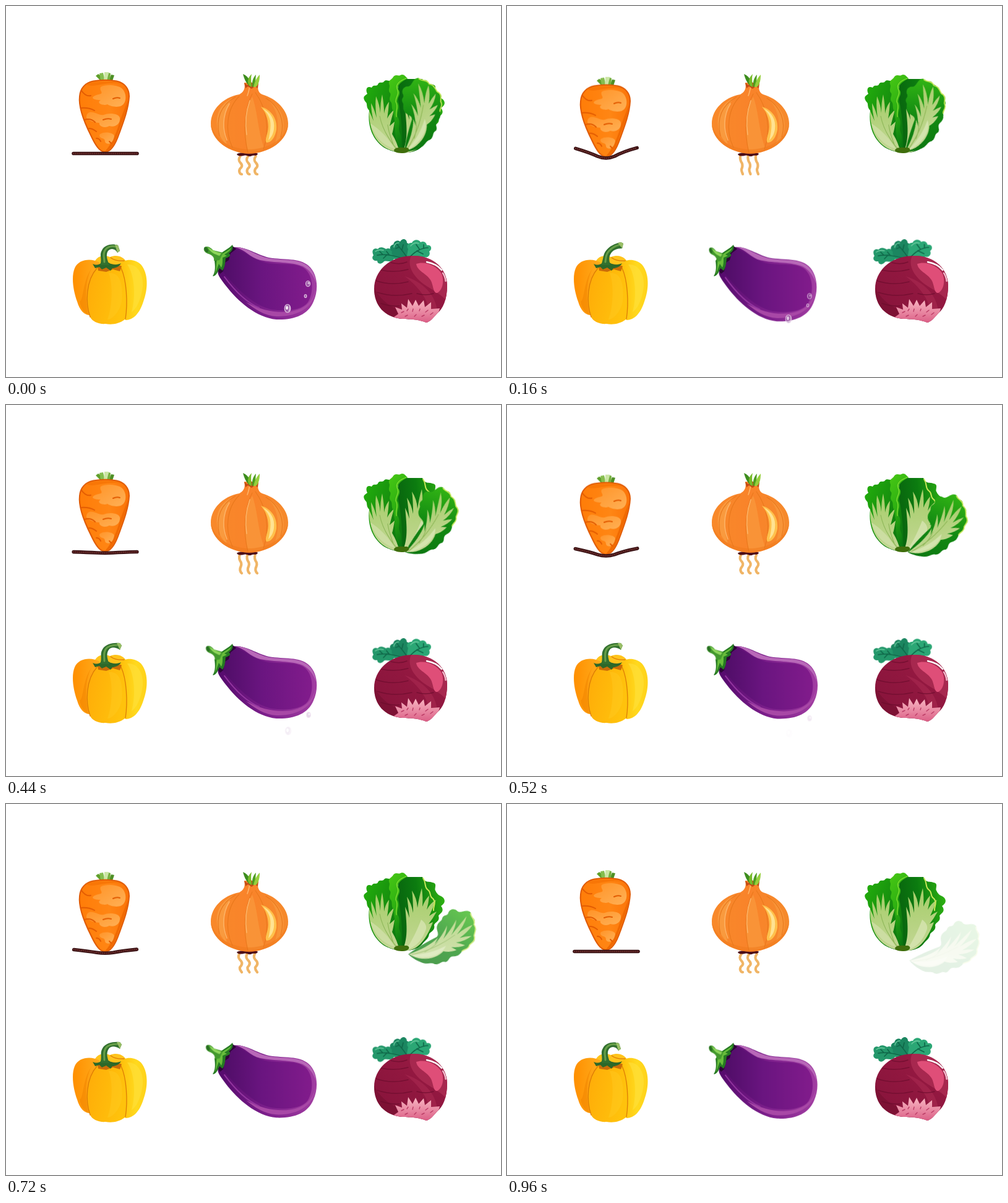
An HTML page for the animation above (1000 ms loop, 800 by 600 pixels).

```html
<!DOCTYPE html>
<html lang="en">
<head>
<meta charset="utf-8">
<title>Vegetables</title>
<style>
html, body { margin: 0; width: 100%; height: 100%; overflow: hidden; background: #fff; }
svg { display: block; width: 800px; height: 600px; }
.line { fill: none; stroke-linecap: round; stroke-linejoin: round; }
.anim { animation: 1s linear infinite; }

/* carrot on its rope: two bounces, then rest */
.carrot { animation-name: bounce; }
.rope { animation-name: rope; }
.carrot, .rope { animation-timing-function: cubic-bezier(.364, 0, .636, 1); }
@keyframes bounce {
  0%, 40%, 80%, 100% { transform: none; }
  20%, 60% { transform: translateY(8.5px); }
}
@keyframes rope {
  0%, 40%, 80%, 100% { d: path("M109 238.5Q132 238.5 147 238.5Q160 238.5 173 238.5Q188 238.5 212 238.5"); }
  20%, 60% { d: path("M111 229.5Q134 237 146 243.5Q160 250 174 243.5Q188 235 210 228.5"); }
}

/* onion roots */
.root { animation-name: wave; }
@keyframes wave {
  0%, 80%, 100% { d: path("M379 243C375 248 376 251 379 254C383 258 381 261 378 263C375 267 377 272 381 272"); }
  16% { d: path("M377 242C376 248 377 251 380 254C382 258 381 261 379 264C378 268 381 271 381 272"); }
  28% { d: path("M377 242C377 248 378 251 379 254C380 258 379 261 379 264C380 268 381 270 381 272"); }
  44% { d: path("M378 243C375 248 377 251 380 254C383 258 380 261 378 264C376 268 379 272 381 272"); }
  60%, 96% { d: path("M377 242C374 248 377 251 380 254C383 258 381 261 378 264C377 268 381 271 381 272"); }
}

/* lettuce leaf peels off, drops and fades */
.fall { transform-origin: 650px 240px; animation-name: fall; }
@keyframes fall {
  0% { transform: translate(-5px, -3px) rotate(-40deg); opacity: 1; }
  16% { transform: translate(-5px, -3px) rotate(-37deg); }
  28% { transform: translate(-5px, -2px) rotate(-28deg); }
  44% { transform: translate(-4px, 0) rotate(-21deg); }
  60% { transform: none; opacity: 1; }
  80% { transform: translateY(8px) rotate(9deg); opacity: .58; }
  96% { transform: translateY(15px) rotate(12deg); opacity: .12; }
  100% { transform: translateY(16px) rotate(12deg); opacity: 0; }
}

/* pepper stem uncurls */
.stem { animation-name: stem; }
.tip { animation-name: tip; }
.shine { animation-name: shine; }
@keyframes stem {
  0%, 96%, 100% { d: path("M152 419C156 409 150 403 155 395C160 385 173 384 181 387L184 396L180 399C177 392 169 391 165 396C161 402 163 409 167 419Z"); }
  16% { d: path("M152 419C156 409 155 403 159 397C165 388 175 384 184 382L188 384L186 392C177 392 171 395 168 400C164 406 165 411 167 419Z"); }
  28% { d: path("M152 419C157 409 158 404 163 398C169 388 178 380 188 376L193 378L192 386C181 388 174 393 170 400C167 406 166 411 167 419Z"); }
  44%, 80% { d: path("M152 419C156 409 151 403 156 395C161 386 174 384 184 385L187 389L184 396C177 391 169 391 166 396C162 402 163 409 167 419Z"); }
}
@keyframes tip {
  0%, 96%, 100% { d: path("M176 386L181 387L184 396L180 399Z"); }
  16% { d: path("M179 383L184 382L188 384L186 392Z"); }
  28% { d: path("M183 379L188 376L193 378L192 386Z"); }
  44%, 80% { d: path("M179 385L184 385L187 389L184 396Z"); }
}
@keyframes shine {
  0%, 96%, 100% { d: path("M159 414C159 406 156 402 160 395C164 389 171 388 177 389"); }
  16% { d: path("M159 414C160 406 160 402 164 397C169 391 175 388 182 386"); }
  28% { d: path("M159 414C161 406 163 402 167 397C172 390 180 384 187 381"); }
  44%, 80% { d: path("M159 414C159 406 157 402 161 395C165 389 173 388 181 388"); }
}

/* eggplant */
.squash { transform-origin: 350px 400px; animation-name: squash; }
.stub { transform-origin: 347px 404px; animation-name: stub; }
@keyframes squash {
  0%, 28%, 44%, 80%, 100% { transform: none; }
  16% { transform: scale(.988, 1.027); }
  60% { transform: scale(.997, 1.008); }
  96% { transform: scale(.996, 1.016); }
}
@keyframes stub {
  0%, 100% { transform: none; }
  16%, 96% { transform: translateY(1.5px) scaleX(.75); }
  28%, 44%, 60%, 80% { transform: translateY(.5px) scaleX(.88); }
}
.d1 { animation-name: drip1; }
.d2 { animation-name: drip2; }
.d3 { animation-name: drip3; }
@keyframes drip1 {
  0% { transform: none; opacity: 1; }
  16% { transform: translateY(17px); opacity: .8; }
  28% { transform: translateY(29px); opacity: .6; }
  44% { transform: translate(1px, 38px); opacity: .2; }
  54%, 100% { transform: translate(1px, 43px); opacity: 0; }
}
@keyframes drip2 {
  0% { transform: none; opacity: 1; }
  16% { transform: translate(1px, 20px); opacity: .7; }
  28% { transform: translate(1px, 39px); opacity: .6; }
  44% { transform: translate(1px, 52px); opacity: .45; }
  60% { transform: translate(1px, 63px); opacity: .1; }
  65%, 100% { transform: translate(1px, 65px); opacity: 0; }
}
@keyframes drip3 {
  0% { transform: none; opacity: 1; }
  16% { transform: translate(2px, 15px); opacity: .7; }
  28% { transform: translate(2px, 27px); opacity: .5; }
  44%, 100% { transform: translate(2px, 38px); opacity: 0; }
}

/* beet greens */
.greens { transform-origin: 650px 408px; animation-name: sway; }
@keyframes sway {
  0%, 80%, 100% { transform: none; }
  16%, 60% { transform: rotate(-1.2deg); }
  28%, 44% { transform: rotate(-.7deg); }
}
</style>
</head>
<body>
<svg viewBox="0 0 800 600">
<defs>
  <linearGradient id="gCarrot"><stop offset="0" stop-color="#ff7d08"/><stop offset=".6" stop-color="#ff8614"/><stop offset="1" stop-color="#fb7408"/></linearGradient>
  <linearGradient id="gGlow" x1="0" y1="0" x2="1" y2="1"><stop offset="0" stop-color="#ff9428"/><stop offset="1" stop-color="#ffb055"/></linearGradient>
  <linearGradient id="gOnion"><stop offset="0" stop-color="#f8892a"/><stop offset=".5" stop-color="#f9832a"/><stop offset="1" stop-color="#f58a2c"/></linearGradient>
  <linearGradient id="gLeaf" x1="0" y1=".4" x2="1" y2=".2"><stop offset="0" stop-color="#08640e"/><stop offset=".45" stop-color="#0c7c10"/><stop offset="1" stop-color="#2fb312"/></linearGradient>
  <linearGradient id="gFall" x1="0" y1="1" x2=".8" y2="0"><stop offset="0" stop-color="#0b7410"/><stop offset=".55" stop-color="#128a12"/><stop offset="1" stop-color="#30b214"/></linearGradient>
  <linearGradient id="gLeft" x1="0" y1="0" x2="1" y2=".8"><stop offset="0" stop-color="#24b00c"/><stop offset="1" stop-color="#0b7410"/></linearGradient>
  <linearGradient id="gMid" x1="0" y1="0" x2=".3" y2="1"><stop offset="0" stop-color="#48c814"/><stop offset=".5" stop-color="#2eb012"/><stop offset="1" stop-color="#0b7a10"/></linearGradient>
  <linearGradient id="gRib" x1="0" y1="0" x2="0" y2="1"><stop offset="0" stop-color="#a5cd68"/><stop offset="1" stop-color="#c3d795"/></linearGradient>
  <linearGradient id="gPepL"><stop offset="0" stop-color="#ff8f00"/><stop offset="1" stop-color="#ffac1c"/></linearGradient>
  <linearGradient id="gPepC" x1="0" y1="0" x2="1" y2=".3"><stop offset="0" stop-color="#ffab08"/><stop offset="1" stop-color="#ffc20c"/></linearGradient>
  <linearGradient id="gPepR"><stop offset="0" stop-color="#ffbe0a"/><stop offset=".6" stop-color="#ffd91e"/><stop offset="1" stop-color="#ffd21a"/></linearGradient>
  <linearGradient id="gEgg"><stop offset="0" stop-color="#4e0d66"/><stop offset=".45" stop-color="#6a1580"/><stop offset="1" stop-color="#821c8c"/></linearGradient>
  <linearGradient id="gEdge"><stop offset="0" stop-color="#540a6c"/><stop offset=".5" stop-color="#7d1f8c"/><stop offset="1" stop-color="#a23ea2"/></linearGradient>
  <linearGradient id="gBeet" x1="0" y1="1" x2="1" y2="0"><stop offset="0" stop-color="#841239"/><stop offset="1" stop-color="#9c1c45"/></linearGradient>
  <linearGradient id="gTail" x1="0" y1="0" x2="0" y2="1"><stop offset="0" stop-color="#f9b9c4"/><stop offset="1" stop-color="#da5c84"/></linearGradient>
  <clipPath id="cBeet"><path d="M655 404C690 402 713 425 713 452C713 475 706 490 697 497C690 505 685 511 679 512C670 508 655 506 640 506C612 503 595 485 595 457C595 430 618 405 655 404Z"/></clipPath>
  <path id="root" class="anim root"/>
</defs>

<!-- carrot -->
<g class="anim carrot">
  <path fill="#5f9f2a" d="M153 121L145 113L149 110L157 115L160 121Z"/>
  <path fill="#4d8f25" d="M166 121L170 111L175 112L172 121Z"/>
  <path fill="#85bd4e" d="M153 121L151 109L157 108L160 121Z"/>
  <path fill="#cbe6a4" d="M158 121L159 107L166 107L164 121Z"/>
  <path fill="#76b040" d="M163 121L166 108L169 109L168 121Z"/>
  <path fill="url(#gCarrot)" stroke="#df5a04" stroke-width="2" d="M160 236C151 236 144 224 137 209C126 187 117 163 119 146C120 133 128 124 141 121.500C153 119.500 168 119.500 179 121.500C191 124 199 133 199 146C198 166 190 187 183 206C177 224 169 236 160 236Z"/>
  <path fill="#f87606" d="M129 127C138 121 180 120 186 126C176 124 166 125 153 127C143 129 136 130 129 127Z"/>
  <path fill="#f06a02" d="M198 150C197 166 188 187 182 203C177 221 170 234 160 235C172 222 180 201 184 186C190 170 194 160 198 150Z"/>
  <g fill="url(#gGlow)">
    <path d="M153 131C161 126 180 128 187 133C196 141 195 157 187 161C180 165 168 162 164 159C157 162 145 157 153 152C137 152 136 146 150 143C160 141 150 137 153 131Z"/>
    <path d="M133 173C140 168 150 178 158 176C167 172 183 174 184 181C185 191 176 197 167 194C158 199 149 193 151 189C143 189 133 185 130 181C130 178 130 175 133 173Z"/>
    <path d="M152 207C160 202 174 205 175 210C174 219 168 225 162 222C158 219 162 216 156 214C151 213 150 209 152 207Z"/>
  </g>
  <path class="line" stroke="#e35c02" stroke-width="2" d="M173 150Q179 147 184 149M157 184Q164 181 170 183M167 219L170 222M122 137Q129 147 137 145M121 165Q134 164 143 169M127 184Q137 181 144 188M134 198Q140 198 146 203M146 214Q151 214 153 219"/>
</g>
<path class="line anim rope" stroke="#3c1416" stroke-width="5.6"/>
<path class="line anim rope" stroke="#74322f" stroke-width="2.2" stroke-dasharray=".1 3"/>

<!-- onion -->
<g class="line" stroke="#f0b566" stroke-width="4.2">
  <use href="#root"/><use href="#root" x="12.5"/><use href="#root" x="25"/>
</g>
<path fill="#4c0c17" d="M373 240C374 236 405 236 407 239C405 244 400 240 396 243C391 244 388 240 384 242C380 243 375 243 373 240Z"/>
<path fill="url(#gOnion)" d="M385 124C387 132 385 139 377 143C350 148 331 168 331 190C331 218 362 238 393 239C425 238 456 218 456 190C456 169 438 150 414 143C407 140 406 132 408 124Z"/>
<g fill="#f99a3e">
  <path d="M366 149C348 157 339 174 341 192C342 205 348 217 357 224C349 199 350 170 366 149Z"/>
  <path d="M398 147C386 165 383 205 391 236C403 237 413 234 418 231C407 205 407 170 398 147Z" opacity=".7"/>
  <path d="M424 152C442 162 452 180 448 202C446 212 440 220 434 224C443 199 442 171 424 152Z" opacity=".7"/>
</g>
<path fill="#f17a1c" d="M331 190C331 218 362 238 393 239C425 238 456 218 456 190C452 213 428 230 396 232C362 232 337 216 331 190Z" opacity=".55"/>
<path class="line" stroke="#e9781c" stroke-width="1.1" d="M377 146C358 164 352 200 366 229M398 142C385 165 383 205 391 237M403 140C421 165 427 200 416 232M371 147C348 160 338 180 345 210M420 149C441 162 452 185 444 212"/>
<path class="line" stroke="#fdb366" stroke-width="1.6" d="M361 158C349 178 350 200 357 217M394 153C388 170 386 190 389 208M394 129C393 135 392 140 390 145"/>
<path fill="#ffc14c" d="M412 163C428 167 439 182 437 200C435 212 429 221 421 221C417 216 424 206 424 195C424 182 419 171 412 163Z"/>
<path fill="#ffe392" d="M415 166C428 172 435 184 433 199C432 207 428 214 424 217C427 205 429 190 426 182C423 174 419 170 415 166Z"/>
<path fill="#c44a14" d="M385 124L390 128L396 123L402 128L408 124L407 133L402 130L397 134L391 130L387 133Z"/>
<path fill="#3d8d1e" d="M394 130C388 125 385 118 383 110C390 113 395 119 397 130Z"/>
<path fill="#77bb2a" d="M393 129C389 122 391 116 397 110C395 118 397 124 397 131Z"/>
<path fill="#4e9d22" d="M398 131C397 121 400 115 404 111C403 118 404 122 402 130Z"/>
<path fill="#96cf3c" d="M400 131C402 122 405 116 410 111C410 119 409 126 404 131Z"/>

<!-- lettuce: back leaf, falling leaf, then the front ones -->
<path fill="url(#gLeaf)" d="M640 237C632 205 629 160 634 128C637 120 642 117 650 118L673 118C678 129 683 124 689 127C698 128 692 136 694 140C698 149 703 148 706 151C711 156 709 161 703 165C710 174 701 177 699 181C702 190 693 191 692 196C694 204 687 206 684 210C683 218 677 221 674 225C668 234 655 238 640 237Z"/>
<path fill="url(#gRib)" d="M641 236C651 215 647 190 645 166Q649 174 652 184Q650 164 648 150Q655 160 658 176Q658 154 656 140Q664 152 665 168Q668 148 672 136Q674 150 673 166Q677 155 684 148Q683 160 680 171Q686 160 695 155Q690 168 684 181Q689 177 696 174Q690 185 683 194L690 191C682 212 670 234 650 237Z"/>
<path fill="#d8e6b5" opacity=".75" d="M646 236C656 222 664 205 671 187C677 192 680 196 679 202C674 217 664 232 646 236Z"/>
<path class="line" stroke="#c9e85a" stroke-width="2" d="M674 120C680 128 675 134 682 139C688 143 683 149 690 153C696 160 690 166 691 172"/>
<g class="anim fall">
  <path fill="url(#gFall)" d="M650 238C663 226 680 214 693 206C698 200 690 195 692 188C693 181 699 180 699 175C701 168 708 171 708 165C711 157 719 158 722 161C728 165 734 157 742 160C748 163 743 168 749 170C755 174 749 180 753 184C759 189 751 194 753 199C758 208 750 210 747 214C747 222 739 221 736 225C732 233 728 234 721 235C716 236 716 244 711 245C704 243 702 251 694 250C688 247 682 252 675 250C668 248 658 245 650 238Z"/>
  <path fill="url(#gRib)" d="M651 238C670 229 685 219 695 207Q693 213 691 218Q702 203 708 186Q708 198 704 208Q715 192 722 175Q722 188 716 201Q728 183 738 168Q736 183 725 199Q738 186 749 181Q742 194 730 204Q740 200 749 199Q740 208 725 212Q734 213 740 215Q731 220 718 220L727 224Q718 229 706 228C698 239 675 250 651 238Z"/>
  <path fill="#dbe8b8" opacity=".75" d="M654 239C676 236 694 229 709 219C706 232 684 246 654 239Z"/>
  <path class="line" stroke="#91b95a" stroke-width="1.1" d="M656 238C682 230 705 215 722 200M676 232C685 226 692 220 696 213"/>
  <path class="line" stroke="#c9e85a" stroke-width="1.8" d="M744 163C744 168 754 173 751 180C756 186 754 190 753 198C757 206 750 210 747 214C746 222 739 221 736 225"/>
</g>
<path fill="url(#gLeft)" d="M640 237C606 237 582 208 587 169C581 163 585 158 581 155C575 147 580 145 584 142C580 134 584 129 591 132C594 126 598 131 601 127C603 121 608 126 611 122C615 118 619 123 623 120C634 130 643 200 640 237Z"/>
<path fill="url(#gRib)" d="M636 236C605 234 586 208 587 170Q591 178 594 186Q590 170 590 157Q595 166 599 181Q596 162 598 146Q604 160 605 173Q605 155 608 143Q611 160 611 174Q613 162 619 155Q618 170 616 182Q620 174 627 168Q623 182 620 194L628 187Q626 200 624 207C630 217 634 227 636 236Z"/>
<path fill="#d3e2ad" opacity=".7" d="M628 231C608 225 594 209 589 190C602 198 619 214 628 231Z"/>
<path class="line" stroke="#8fb85a" stroke-width="1.2" d="M631 231C618 215 608 199 604 178M626 224C622 213 618 204 617 192"/>
<path fill="url(#gMid)" d="M621 141C616 136 622 131 619 126C618 120 623 119 625 116C629 109 634 114 637 112C643 109 645 114 649 117C641 122 631 127 634 135C640 142 632 148 632 155C638 163 631 171 633 179C639 188 633 196 636 204C641 214 637 225 638 235C630 226 629 207 628 192C629 182 625 178 627 171C621 165 626 158 621 154C618 149 623 145 621 141Z"/>
<path class="line" stroke="#83de34" stroke-width="1.3" d="M647 117C638 120 629 126 632 134C637 142 629 148 630 155C635 163 629 171 631 179"/>
<path fill="#3f6e0c" d="M627 233C630 227 640 229 648 229C654 231 652 237 642 238C634 238 627 237 627 233Z"/>

<!-- pepper -->
<path fill="#ffc41c" d="M144 412C150 402 162 403 168 406C180 401 190 406 194 413L188 432L148 430Z"/>
<path fill="url(#gPepL)" d="M151 415C140 408 118 408 111 424C105 438 109 462 115 478C119 492 126 500 136 500C150 490 152 430 151 415Z"/>
<path fill="#f08600" opacity=".55" d="M147 416C129 427 126 465 133 499C125 496 121 488 119 478C127 475 122 435 147 416Z"/>
<path fill="url(#gPepR)" d="M184 418C190 409 207 408 218 418C230 432 230 457 222 478C216 497 206 508 193 508C184 490 184 440 184 418Z"/>
<path fill="#ffe23c" opacity=".6" d="M196 418C213 417 222 434 221 452C219 472 212 489 203 495C210 470 208 435 196 418Z"/>
<path fill="url(#gPepC)" d="M147 423C156 428 179 428 186 423C195 440 197 480 192 507C183 514 171 516 161 514C150 515 139 510 136 503C127 480 130 443 147 423Z"/>
<path fill="#ffcb24" opacity=".4" d="M166 432C184 430 190 450 187 478C184 494 172 507 164 507C172 485 173 450 166 432Z"/>
<path class="line" stroke="#dd7b05" stroke-width="1.3" d="M147 424C129 444 128 480 136 503M186 424C195 443 197 480 193 506M169 407Q177 413 191 412"/>
<path fill="#cb6d08" d="M148 421C158 417 178 416 187 421L184 429L173 426L162 430L149 428Z"/>
<path fill="#2c6829" d="M140 417C147 420 151 418 155 415L166 415C171 419 180 419 186 416C183 422 176 424 172 424L169 428L162 423L155 426L151 422L144 424Z"/>
<path class="anim stem" fill="#32702f"/>
<path class="line anim shine" stroke="#679f48" stroke-width="3"/>
<path class="anim tip" fill="#9abf67"/>

<!-- eggplant -->
<g class="anim squash">
  <path fill="url(#gEdge)" d="M364 391C384 386 401 401 425 407C450 411 474 407 489 420C505 434 505 461 497 478C488 500 465 508 437 507C405 504 375 478 355 452C346 440 339 432 344 426Z"/>
  <path fill="#b868b8" d="M370 390C388 389 402 403 425 408C450 412 472 408 487 420C495 426 500 437 501 447C497 436 491 427 480 421C461 413 434 416 411 411C394 407 387 394 370 390Z"/>
  <path fill="#a848a6" d="M500 458C500 486 472 503 437 502C418 501 401 490 388 479C410 490 427 495 447 495C477 495 495 482 500 458Z"/>
  <path fill="url(#gEgg)" d="M362 393C383 391 395 411 424 416C452 419 468 414 483 425C498 438 497 465 488 479C478 493 450 494 430 491C399 485 368 452 347 425Z"/>
  <path class="line" stroke="#9436a0" stroke-width="2" d="M353 438C370 461 390 480 409 488"/>
</g>
<path fill="#2c0637" d="M366 388L372 393L363 400L360 411L354 415L351 429L346 433L341 427L348 404Z"/>
<path fill="#267a22" d="M343 404C350 396 359 394 366 386C368 392 365 397 360 400C365 403 361 406 355 408C354 416 354 422 350 428L345 424C342 430 340 437 334 437C339 429 338 420 337 412Z"/>
<path fill="#68bd3c" d="M345 405C352 398 359 396 364 391C363 396 357 399 353 402L357 404L350 407C350 415 350 419 348 423L344 417C341 424 340 430 337 434C341 424 339 417 341 410Z"/>
<g class="anim stub">
  <path fill="#43992e" d="M321 390C326 387 331 391 335 395C340 396 346 398 351 399L345 411L336 412C337 405 332 403 328 401C323 400 317 395 321 390Z"/>
  <path fill="#8dd55b" d="M326 390C332 394 338 397 348 400L345 404C337 401 330 399 326 390Z"/>
  <ellipse cx="323.500" cy="394" rx="2.600" ry="4.700" fill="#296f23" transform="rotate(-30 323.500 394)"/>
</g>
<g fill="#a978b4" fill-opacity=".65" stroke="#e6cfe6" stroke-width="1.200">
  <g class="anim d1"><ellipse cx="455" cy="489" rx="4.800" ry="6.500"/><ellipse cx="454" cy="488" rx="2" ry="3" fill="#fff" fill-opacity=".9" stroke="none"/><path class="line" d="M457 493Q459 490 458 486"/></g>
  <g class="anim d2"><ellipse cx="488" cy="449" rx="3.500" ry="4.500"/><circle cx="489" cy="448" r="1.700" fill="#fff" stroke="none"/></g>
  <ellipse class="anim d3" cx="484" cy="469" rx="1.800" ry="2.500"/>
</g>

<!-- beet -->
<g class="anim greens">
  <path fill="#23976a" d="M650 409C638 405 635 412 627 409C623 416 616 411 611 413C606 419 600 417 600 412C593 413 590 407 594 403C590 396 594 390 601 393C605 388 611 391 614 393C620 390 625 395 626 399Z"/>
  <path fill="#1b8660" d="M652 410C643 410 638 407 632 405C626 406 622 401 624 397C618 393 621 386 626 386C627 379 634 378 637 381C641 374 648 377 648 383C655 386 651 392 654 396Z"/>
  <path fill="#2ba775" d="M648 409C648 401 649 398 650 393C646 388 650 382 656 383C659 377 667 377 670 382C676 379 680 384 680 387C687 385 690 393 684 397C687 403 681 408 676 406C672 413 663 411 659 408Z"/>
  <g class="line" stroke="#0f6849" stroke-width="1.700">
    <path d="M600 403C614 400 631 405 648 410M609 402L604 397M619 402L615 397M616 402L610 408M630 383C636 391 644 399 648 407M636 390L630 392M640 394L642 386M682 391C671 391 659 398 651 408M668 393L663 386M675 391L675 386M664 396L674 401"/>
  </g>
  <path class="line" stroke="#64c69a" stroke-width="1.600" d="M597 397Q602 393 610 395M627 390Q628 383 635 383M654 388Q660 381 667 384"/>
</g>
<g clip-path="url(#cBeet)">
  <path fill="url(#gBeet)" d="M590 400H718V515H590Z"/>
  <path fill="#a7284f" d="M655 404C648 418 656 435 674 449C691 461 706 467 712 478L718 400Z"/>
  <path fill="#75102f" d="M594 454C607 480 629 493 661 499L645 512L590 510Z" opacity=".6"/>
  <path fill="#b53359" opacity=".4" d="M644 437C665 452 680 472 684 491L697 494C695 469 676 447 644 437Z"/>
  <path class="line" stroke="#6b0c2d" stroke-width="1.500" opacity=".7" d="M606 427Q628 432 650 426M597 444Q622 453 650 446M600 463Q626 472 656 465M606 481Q620 486 636 485M622 415Q637 419 648 414M664 465Q678 469 691 465"/>
  <path fill="#df4e78" d="M663 417C676 412 696 419 704 433C709 446 705 460 697 464C690 465 691 451 686 443C680 433 664 428 663 417Z"/>
  <path fill="url(#gTail)" d="M624 505L634 498L629 487L640 491L639 481L648 488L650 474L657 485L662 475L667 485L675 476L677 487L687 479L687 490L701 489L694 513H630Z"/>
  <path class="line" stroke="#bc3c66" stroke-width="1.400" d="M639 496L643 494M648 493L650 490M657 494L658 490M668 493L669 490M678 495L682 492M645 502L649 500M660 502L663 499M672 502L676 500M686 499L690 496"/>
</g>
<path class="line" stroke="#fff" stroke-width="2.400" d="M680 414Q696 417 704 427"/>
<path class="line" stroke="#f8c9d7" stroke-width="2.200" d="M706 432Q710 438 710.500 445"/>
</svg>
</body>
</html>
```
